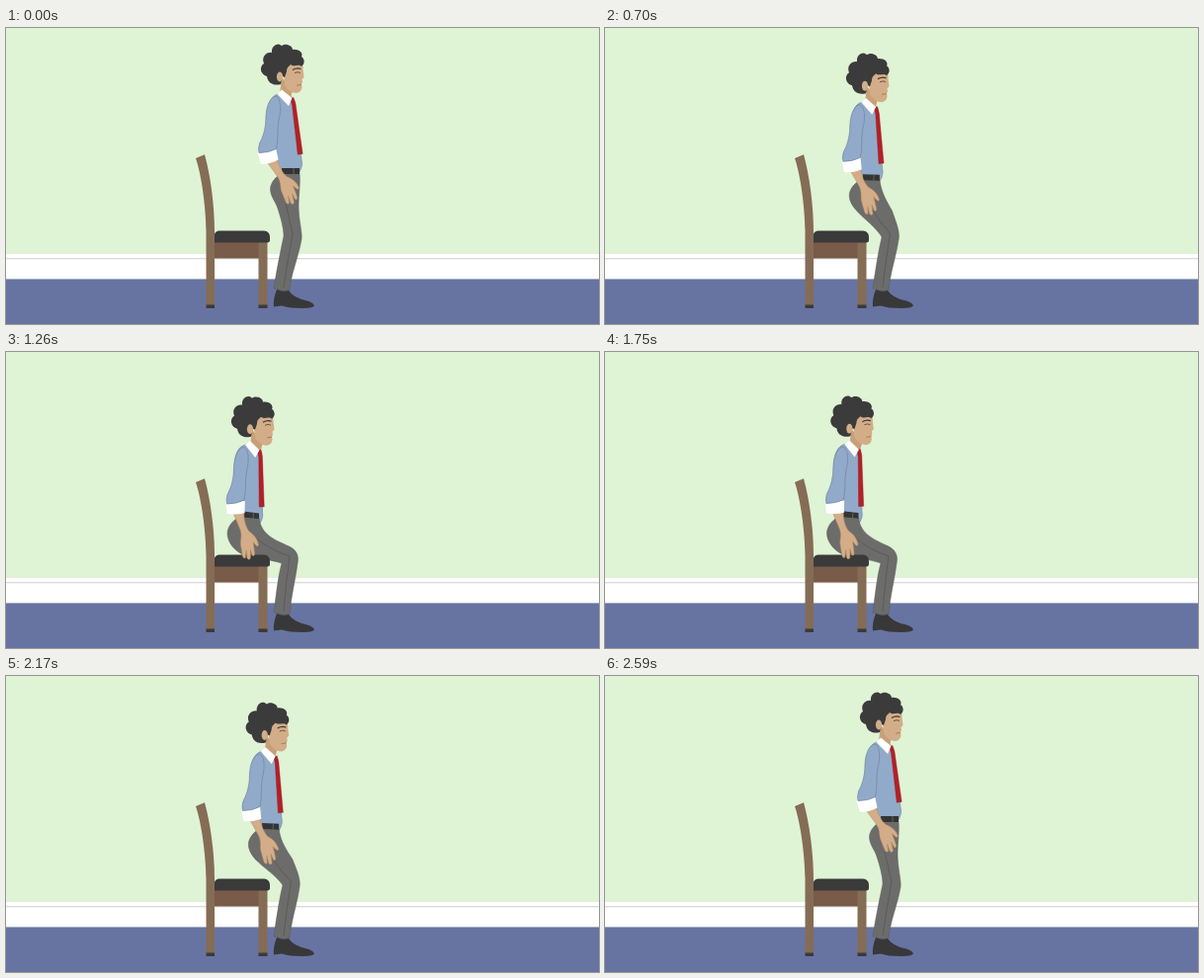
An HTML page for the animation above (2.8 s loop, 600 by 300 pixels).

```html
<!DOCTYPE html>
<html lang="en">
<head>
<meta charset="utf-8">
<title>Sit and stand</title>
<style>
html, body { margin: 0; width: 100%; height: 100%; overflow: hidden; }
svg { display: block; width: 100vw; height: 100vh; }
</style>
</head>
<body>
<svg viewBox="0 0 600 300">
  <rect width="600" height="300" fill="#dff3d5"/>
  <rect y="229" width="600" height="25.5" fill="#fff"/>
  <rect y="233" width="600" height="1.4" fill="#d9dbda"/>
  <rect y="254.5" width="600" height="46" fill="#6774a2"/>

  <g id="torso">
    <path fill="#92aac9" stroke="#70839f" stroke-width=".6" d="M275 67C268 69 265 77 266 90C267 108 274 128 277 147L297 146Q301 139 299 133L292 74L286 66Z"/>
  </g>

  <!-- head -->
  <g id="head">
    <path fill="#c99f78" d="M279 50L277 66L287 74L290 63Z"/>
    <path fill="#d3ad88" d="M280 36L299 34Q301 39 300.5 42L301.5 50L299.5 52L300 55L299 57L299.5 60Q299 65 294 66Q287 66 282 58Z"/>
    <path fill="#3b3b3c" d="M278 57C271 59 265 56 264 49C257 47 256 39 261 36C258 29 264 24 269 25C268 18 275 14 279 18C283 15 290 18 290 22C297 21 301 26 299 29C303 32 302 37 299 39C295 36 292 40 288 37C286 39 284 40 284 44L282 50L280 49Z"/>
    <ellipse cx="277" cy="49.5" rx="3.1" ry="5" fill="#d3ad88"/>
    <path fill="none" stroke="#3b3b3c" stroke-width="1.3" d="M290 42.5Q294 40 298.5 41.5"/>
    <path fill="none" stroke="#6d5746" stroke-width="1" d="M292 45.6Q295 44 298 45.4"/>
    <path fill="none" stroke="#a8735b" stroke-width=".9" d="M294 58.2L299 57.4"/>
  </g>

  <g id="collar">
    <path fill="#b32026" stroke="#8d1b22" stroke-width=".4" d="M287.5 71.5L291 70.5L293 77L300.2 127.5L295.2 128.3L289.5 78Z"/>
    <path fill="#fff" d="M274.5 67L279 62.5L289.5 71L286 79Z"/>
  </g>

  <path id="legs" fill="#6c6c6b" stroke="#5b5b5b" stroke-width=".5"/>
  <path id="seam" fill="none" stroke="#535353" stroke-width=".7"/>
  <path id="belt" fill="#343435"/>
  <path id="buckle" fill="none" stroke="#6c6c6b" stroke-width=".8"/>
  <path fill="#383839" d="M274 265Q270 275 271 282.5L279 281.5Q286 284 300 284Q312 284 312 281Q310 277 299 275Q290 272 286 266Q280 268 274 265Z"/>

  <!-- chair -->
  <rect x="211" y="216" width="46" height="17.5" fill="#785b48"/>
  <path fill="#856c55" d="M192 132L201 128.3C207 150 211 180 211 206V284H202.5V206C202 180 198 150 192 132Z"/>
  <rect x="255.5" y="216" width="9" height="68" fill="#856c55"/>
  <path fill="#3a3a3b" d="M202.5 280.5H211V284H202.5ZM255.5 280.5H264.5V284H255.5ZM211 217.5V209Q212 205.5 216 205.5H261Q267 206 267 212V215Q267 217.5 264 217.5Z"/>

  <g id="arm">
    <g id="forearm">
      <path fill="#d3ad88" stroke="#b48c67" stroke-width=".5" d="M263.5 135L274.5 132C276 141 280 147 284 150.5C290 153 294 156 296.5 162Q296 164.5 293.5 162.5L290.5 160L294.5 171Q295 175 292.5 173.5L289.5 168L291.5 177Q290 180 288 177L285.5 170L286.5 177.5Q284.5 179.5 283 176L278.5 165C277.5 160 278 156 275 151Z"/>
      <path fill="#fff" d="M254.5 126.5L273 121.5L275.5 133.5Q267 138 258 138Z"/>
    </g>
    <path fill="#92aac9" stroke="#70839f" stroke-width=".7" d="M272 69C266 72 263.5 80 263 90C263 104 259 112 256.5 117Q255 122 256 126.5Q266 126.5 273.5 122.5C276 112 274 103 276 93C279 82 278 69 272 69Z"/>
  </g>
</svg>
<script>
const LOOP = 2800, STEP = 70;
const $ = id => document.getElementById(id);

// Standing and seated outlines, with matching points
const shapes = {
  legs: [
    "M280 147C273 150 267.5 157 267.5 163C267.5 171 273 176 275 183C278 192 281 203 281 211C278 225 273 250 271 264Q279 267 287 266C288 250 296 232 299 214C300 207 296 195 296 180C296 170 298 158 297 147Z",
    "M239 166C230 169 224 177 224 184C224 193 232 203 242 206C255 208 272 212 279 214C275 228 273 250 271 264Q279 267 287 266C288 250 293 230 295 214C297 204 292 199 284 196C274 191 258 186 256 168Z"],
  seam: [
    "M283 178Q287 195 290 209Q285 235 281 263",
    "M252 188Q268 201 287 207Q283 235 281 263"],
  belt: [
    "M279 142L297 142L297 148L279.5 148Z",
    "M240 161.5L256 163.5L256 169L239.5 167.5Z"],
  buckle: ["M291 142L291 148", "M250.5 162.5L250 169"]
};

const smooth = p => p * p * (3 - 2 * p);
const clamp = p => Math.min(1, Math.max(0, p));

// 0 = standing, 1 = seated
function seated(t) {
  const down = clamp((t - 280) / 980), up = clamp((t - 1680) / 910);
  return smooth(down * (1 + .2 * (1 - down))) - smooth(up * (1 - .18 * (1 - up)));
}

function tween([a, b], sx, sy) {
  const to = b.match(/[\d.]+/g);
  let i = 0;
  return a.replace(/[\d.]+/g, n => {
    const k = i % 2 ? sy : sx;
    return (+n + (to[i++] - n) * k).toFixed(2);
  });
}

function draw() {
  const t = Math.floor(performance.now() % LOOP / STEP) * STEP;
  const sx = clamp(seated(t)), sy = sx ** 1.5;
  const move = (id, x, y, turn = "") =>
    $(id).setAttribute("transform", `translate(${x * sx} ${y * sy}) ${turn}`);
  const lean = `rotate(${6 * sx} 290 71)`;
  move("torso", -33, 28.5, lean);
  move("collar", -33, 28.5, lean);
  move("head", -30, 28.7);
  move("arm", -32.5, 27.5);
  move("forearm", 0, 0, `rotate(${13 * sx} 265 128)`);
  for (const id in shapes) $(id).setAttribute("d", tween(shapes[id], sx, sy));
  requestAnimationFrame(draw);
}
draw();
</script>
</body>
</html>
```
